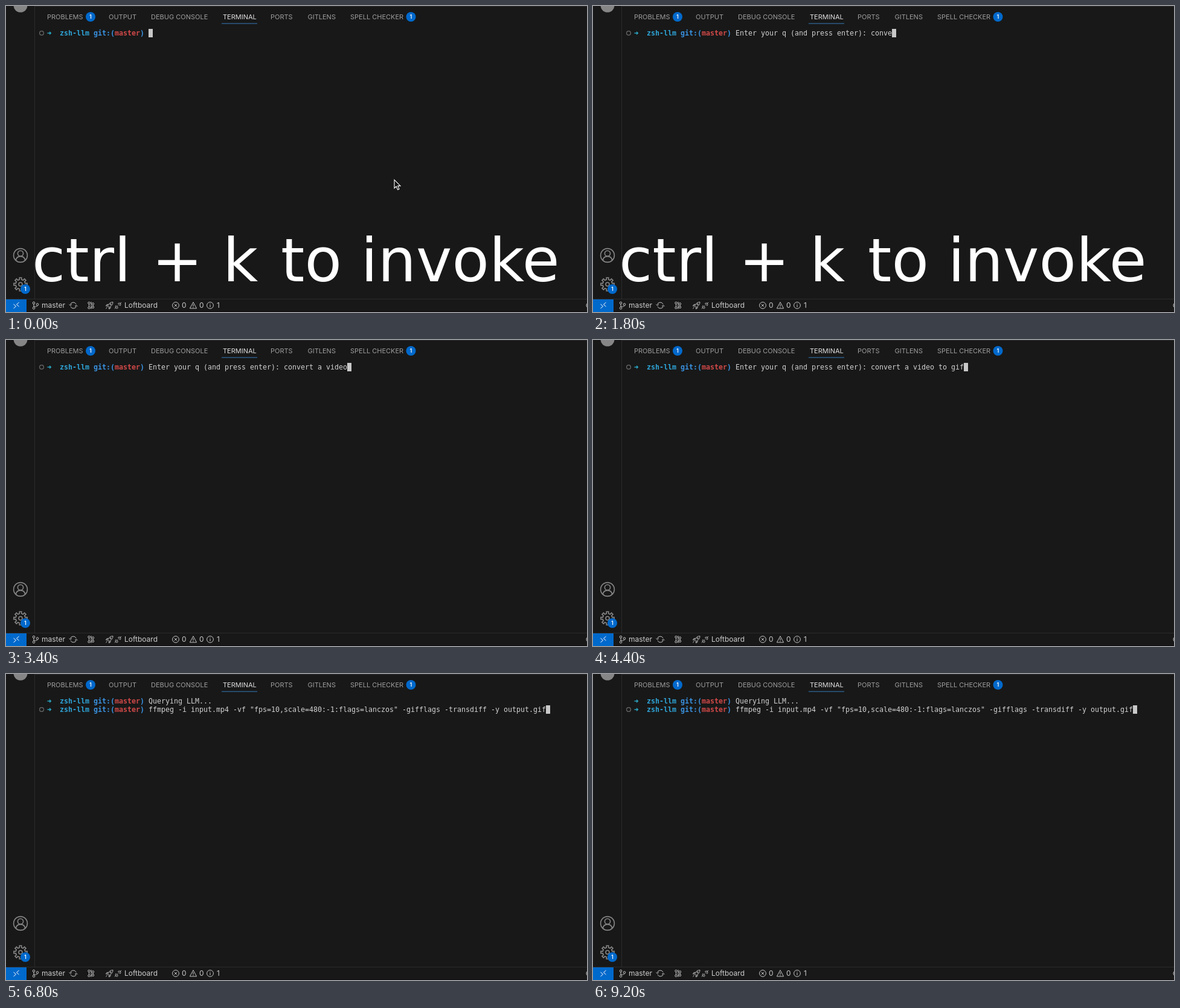
Write an HTML page that moves like this. It is 962 px wide and 508 px high and loops after 9.6 s.

```html
<!DOCTYPE html>
<html lang="en">
<head>
<meta charset="utf-8">
<style>
  html, body { margin: 0; width: 100%; height: 100%; overflow: hidden; background: #181818; }
  svg { display: block; }
  text { white-space: pre; }
  .ui { font: 11px Inter, sans-serif; fill: #9d9d9d; }
  .status { font: 12px Inter, sans-serif; fill: #ccc; }
  .term { font: 11.63px "DejaVu Sans Mono", monospace; fill: #d0d0d0; }
  .term .dir, .term .git, .term .branch { font-weight: bold; }
  .dir { fill: #2ea3d6; }
  .git { fill: #3992e0; }
  .branch { fill: #d04848; }
  .badge { fill: #0069cc; }
  .num { font: 600 9px Inter, sans-serif; fill: #fff; text-anchor: middle; }
  .caption { font: 100.5px "DejaVu Sans", sans-serif; fill: #fff; }
  .line { fill: none; stroke: #868686; stroke-width: 1.6; }
  .thin { fill: none; stroke: #c4c4c4; stroke-width: 1; }
  .arrow { fill: none; stroke: #2aa0bd; stroke-width: 1.5; }
</style>
</head>
<body>
<svg width="962" height="508" viewBox="0 0 962 508">
  <defs>
    <g id="prompt">
      <path class="arrow" d="M68.5 45H74M72 42.7L74.3 45L72 47.3"/>
      <text class="term" x="89" y="49"><tspan class="dir">zsh-llm </tspan><tspan class="git">git:(</tspan><tspan class="branch">master</tspan><tspan class="git">)</tspan></text>
    </g>
  </defs>

  <rect width="962" height="508" fill="#181818"/>
  <path d="M47 .5H962M47.5 0V486M0 486.5H962" stroke="#2b2b2b"/>

  <!-- side bar -->
  <circle cx="24" cy="-1" r="11.5" fill="#868686"/>
  <g class="line">
    <circle cx="24" cy="414" r="11.4"/>
    <circle cx="24" cy="410.8" r="4.6"/>
    <path d="M16.3 422.4C17 417.6 20 415.6 24 415.6S31 417.6 31.7 422.4"/>
    <path id="gear"/>
    <circle cx="24" cy="462" r="3"/>
  </g>

  <!-- panel tabs -->
  <g id="tabs" class="ui"></g>
  <rect x="357" y="28.5" width="59" height="1.2" fill="#2f6b9f"/>
  <g id="badges"></g>

  <!-- status bar -->
  <rect x="34" y="507" width="928" height="1" fill="#100b0d"/>
  <rect y="487" width="34" height="21" class="badge"/>
  <path d="M12.5 495L16.5 498.5L12.5 502M21.5 492L17.5 495.5L21.5 499" fill="none" stroke="#fff"/>
  <g class="thin">
    <circle cx="46" cy="493" r="1.8"/><circle cx="46" cy="501.5" r="1.8"/><circle cx="52" cy="495.5" r="1.8"/>
    <path d="M46 495V499.7M52 497.3C52 499 50 499 46 499"/>
    <path d="M106.5 496A5 5 0 0 1 116 495M116.5 498A5 5 0 0 1 107 499M104.5 495.5L106.5 497.5L108.8 495.5M114 498.5L116.5 496.5L118.5 498.5"/>
    <circle cx="137.5" cy="493" r="1.7"/><circle cx="137.5" cy="501" r="1.7"/><circle cx="144" cy="494.5" r="1.7"/><circle cx="144" cy="500" r="1.7"/>
    <path d="M137.5 494.7V499.3M141 491V503M144 496.2V498.3"/>
    <path d="M168.5 498C170 494 173 491.5 177 491.5C177 495.5 174.5 498.5 170.8 500.3ZM169.5 495.5H167L165.5 498L168.5 498M173 499.5V501.5L170.5 503V500.3M167.5 500L165.5 502.5"/>
    <circle cx="173.2" cy="495.3" r="1.1"/>
    <path d="M180 502.5L182.5 500M182 497.5L185.5 501C184 502.8 182.6 502 181.8 501.2S180.8 499 182 497.5ZM188.5 494.5L191 492M185.5 494L189 497.5C190.3 496 190 494.6 189.2 493.8S187 492.6 185.5 494ZM184 498.8L185.5 497.3"/>
    <circle cx="281" cy="497" r="5.4"/><path d="M278.8 494.8L283.2 499.2M283.2 494.8L278.8 499.2"/>
    <path d="M310 491.7L315.6 502H304.4ZM310 495V499M310 500V501"/>
    <circle cx="338" cy="497" r="5.4"/><path d="M338 496V500M338 494V495"/>
    <circle cx="966" cy="497" r="5"/>
  </g>
  <g id="status" class="status"></g>

  <!-- terminal -->
  <use href="#prompt"/>
  <use id="prompt2" href="#prompt" y="14"/>
  <circle id="marker" cx="59" r="3.4" fill="none" stroke="#6c6c6c" stroke-width="1.2"/>
  <text id="row1" class="term" x="236" y="49"></text>
  <text id="row2" class="term" x="236" y="63"></text>
  <rect id="cursor" width="7" height="14" fill="#c8c8c8"/>

  <g id="caption" class="caption"></g>
  <path id="mouse" d="M643 288.5V302.5L646.2 299.5L648.6 305L651 304L648.7 298.6H653Z" fill="#111" stroke="#fff" stroke-width="1.1"/>
</svg>
<script>
const $ = id => document.getElementById(id);
const words = (list, y) => list.map(([x, s]) => `<text x="${x}" y="${y}">${s}</text>`).join("");

$("tabs").innerHTML = words([[68, "PROBLEMS"], [170, "OUTPUT"], [240, "DEBUG CONSOLE"],
  [359, "<tspan fill='#e0e0e0'>TERMINAL</tspan>"], [438, "PORTS"], [499.5, "GITLENS"], [570, "SPELL CHECKER"]], 22);
$("status").innerHTML = words([[59, "master"], [196, "Loftboard"], [291, "0"], [320, "0"], [349, "1"]], 501.3);
$("caption").innerHTML = words([[43, "ctrl"], [241.5, "+"], [359, "k"], [455, "to"], [587.5, "invoke"]], 457);
$("badges").innerHTML = [[140, 18], [670.5, 18], [32, 470]].map(([x, y]) =>
  `<circle class="badge" cx="${x}" cy="${y}" r="8"/><text class="num" x="${x}" y="${y + 3.2}">1</text>`).join("");

// eight teeth, four corners each
$("gear").setAttribute("d", "M" + Array.from({ length: 32 }, (_, i) => {
  const r = i % 4 < 2 ? 11.2 : 8, a = (Math.floor(i / 4) + [-.2, .2, .27, .73][i % 4]) * Math.PI / 4;
  return `${(24 + r * Math.sin(a)).toFixed(2)} ${(462 - r * Math.cos(a)).toFixed(2)}`;
}).join("L") + "Z");

const LOOP = 9600, TICK = 200;
const ASK = 600, TYPE = 1000, CAPTION_END = 2000, QUERY = 5600, ANSWER = 6200;
const CHAR_MS = 154;
const question = "convert a video to gif";
const command = 'ffmpeg -i input.mp4 -vf "fps=10,scale=480:-1:flags=lanczos" -gifflags -transdiff -y output.gif';

const show = (id, on) => $(id).style.display = on ? "" : "none";

function draw(t) {
  const answered = t >= ANSWER, querying = t >= QUERY;
  const typed = question.slice(0, Math.max(0, Math.floor((t - TYPE) / CHAR_MS)));
  const line = querying ? "Querying LLM..." : t >= ASK ? "Enter your q (and press enter): " + typed : "";
  $("row1").textContent = line;
  $("row2").textContent = answered ? command : "";
  show("prompt2", answered);
  show("caption", t < CAPTION_END);
  show("mouse", t < ASK);
  $("marker").setAttribute("cy", answered ? 59 : 45);
  const col = answered ? 24 + command.length : querying ? 0 : 24 + line.length;
  $("cursor").setAttribute("x", 68 + col * 7);
  $("cursor").setAttribute("y", querying ? 52 : 38);
}

const start = performance.now();
function frame() {
  const t = (performance.now() - start) % LOOP;
  draw(Math.floor(t / TICK) * TICK);
  requestAnimationFrame(frame);
}
frame();
</script>
</body>
</html>
```
